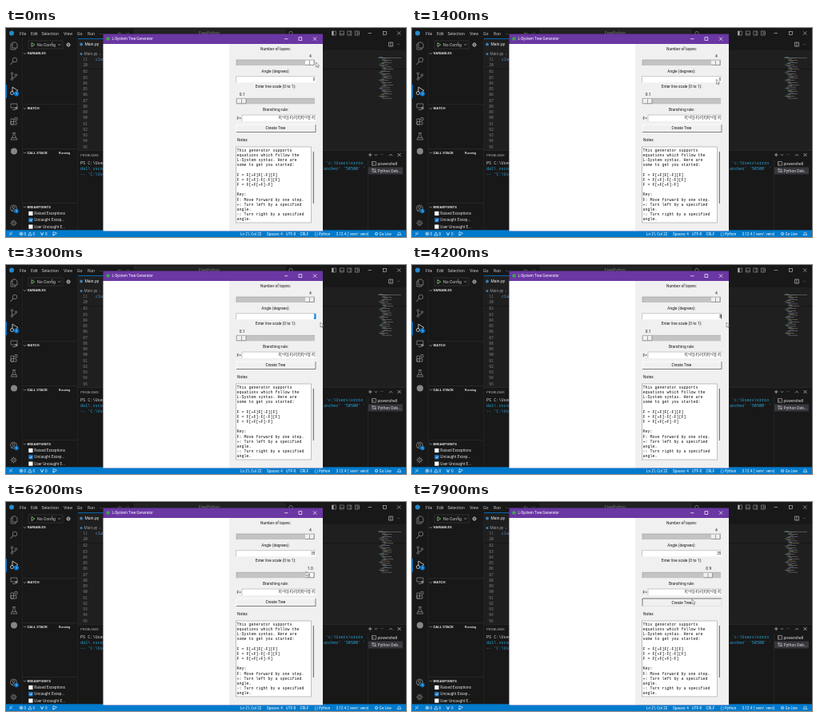
Recreate the animation shown at these times as an HTML page with a canvas. Size 500 by 262 pixels, loop 8 s.

```html
<!DOCTYPE html>
<html lang="en">
<head>
<meta charset="utf-8">
<title>L-System Tree Generator</title>
<style>
html, body { margin: 0; width: 100%; height: 100%; overflow: hidden; background: #181818; }
canvas { display: block; width: 500px; height: 262px; }
</style>
</head>
<body>
<canvas id="stage"></canvas>
<script>
const LOOP = 8000;
const UI = 'Roboto, "Open Sans", sans-serif';
const HUMANIST = '"Open Sans", "Noto Sans", sans-serif';
const CODE = '"Noto Sans Mono", "DejaVu Sans Mono", monospace';
const COURIER = '"Liberation Mono", monospace';
const canvas = document.getElementById('stage');
const ctx = canvas.getContext('2d');
const dpr = window.devicePixelRatio || 1;
canvas.width = 500 * dpr;
canvas.height = 262 * dpr;
ctx.scale(dpr, dpr);

function rect(x, y, w, h, fill) {
  ctx.fillStyle = fill;
  ctx.fillRect(x, y, w, h);
}
function box(x, y, w, h, color, lw = 0.7) {
  ctx.strokeStyle = color;
  ctx.lineWidth = lw;
  ctx.strokeRect(x, y, w, h);
}
function text(s, x, y, size, color, { font = UI, align = 'left', weight = 400 } = {}) {
  ctx.font = `${weight} ${size}px ${font}`;
  ctx.textAlign = align;
  ctx.textBaseline = 'middle';
  ctx.fillStyle = color;
  ctx.fillText(s, x, y);
}
function path(d, color, lw = 0.8, fill) {
  const p = new Path2D(d);
  if (fill) { ctx.fillStyle = fill; ctx.fill(p); }
  ctx.strokeStyle = color;
  ctx.lineWidth = lw;
  ctx.stroke(p);
}
function dot(x, y, r, fill) {
  ctx.fillStyle = fill;
  ctx.beginPath();
  ctx.arc(x, y, r, 0, 7);
  ctx.fill();
}
function ring(x, y, r, color, lw = 0.8) {
  ctx.strokeStyle = color;
  ctx.lineWidth = lw;
  ctx.beginPath();
  ctx.arc(x, y, r, 0, 7);
  ctx.stroke();
}
function gear(x, y, r, color) {
  ring(x, y, r * 0.8, color, 0.8);
  ring(x, y, r * 0.3, color, 0.6);
  for (let i = 0; i < 8; i++) {
    const a = i * Math.PI / 4, dx = Math.cos(a) * r, dy = Math.sin(a) * r;
    path(`M${x + dx * 0.8} ${y + dy * 0.8}L${x + dx * 1.25} ${y + dy * 1.25}`, color);
  }
}

function menuBar() {
  dot(7, 6.5, 3, '#2489ca');
  [['File', 17], ['Edit', 31], ['Selection', 44.5], ['View', 72], ['Go', 89], ['Run', 102], ['···', 117]]
    .forEach(([s, x]) => text(s, x, 7, 5.2, '#c4c4c4'));
  path('M140 6.5h5M142 4.5l-2 2 2 2', '#666', 0.5);
  path('M149 6.5h5M152 4.5l2 2-2 2', '#444', 0.5);
  rect(160, 2, 189, 9, '#222');
  box(160, 2, 189, 9, '#333', 0.5);
  text('FreePython', 254, 6.5, 5.2, '#777', { align: 'center' });
  ring(356, 6.5, 2.2, '#999', 0.6);
  for (let i = 0; i < 4; i++) {
    const x = 407.5 + i * 9.7, c = '#b0b0b0';
    box(x, 4, 5, 5, c, 0.5);
    if (i == 0) rect(x, 4, 2, 5, c);
    if (i == 1) path(`M${x} 7.3h5`, c, 0.5);
    if (i == 2) path(`M${x + 3.3} 4v5`, c, 0.5);
    if (i == 3) path(`M${x + 2.5} 4v5M${x + 2.5} 6.5h2.5`, c, 0.5);
  }
  path('M452.5 6.5h4.5M489 4.3l4.4 4.4M493.4 4.3l-4.4 4.4', '#ccc', 0.6);
  box(471.5, 4.5, 3.8, 3.8, '#ccc', 0.6);
}

function activityBar() {
  const c = '#868686';
  path('M8 18h4l2 2v5h-6zM8 20H6v7h6v-2', c);
  ring(11, 40, 2.8, c);
  path('M9 42l-3.5 4', c, 1);
  ring(7.5, 57, 1.3, c); ring(7.5, 64, 1.3, c); ring(12.5, 59, 1.3, c);
  path('M7.5 58.3v4.4M12.5 60.3q0 2-5 2', c);
  rect(0, 71, 1, 17, '#0078d4');
  path('M8 80v-6l7 4.5-4 2.5', '#e0e0e0');
  ring(7.5, 81.5, 2, '#e0e0e0');
  dot(13, 82.5, 3, '#0078d4');
  text('1', 13, 82.8, 4, '#fff', { align: 'center' });
  path('M6 95h8v5H6zM8 102.5h4', c);
  dot(13, 100.5, 1.7, c);
  path('M6 114h3.5v7H6zM6 117.5h7v3.5H6zM11 112.5h3v3h-3z', c);
  path('M8 131.5h4M9 131.5v3l-3 5.5h8l-3-5.5v-3M7.5 137.5h5', c);
  dot(10, 154.5, 4, c);
  ring(9.5, 226, 4, c); ring(9.5, 225, 1.5, c);
  path('M6.8 229q2.7-3 5.4 0', c);
  dot(13, 229.5, 2.7, '#0078d4');
  text('1', 13, 229.8, 3.7, '#fff', { align: 'center' });
  gear(9.5, 244.5, 3.2, c);
}

function sidebar() {
  box(28, 16, 43, 10, '#3c3c3c', 0.6);
  path('M32 18.5v5l3.8-2.5z', '#89d185', 0.8);
  text('No Config', 39, 21.2, 5.2, '#ccc');
  path('M65 20l1.7 1.7 1.7-1.7', '#ccc', 0.6);
  gear(78, 21, 2.3, '#bbb');
  [['VARIABLES', 32], ['WATCH', 101], ['CALL STACK', 156.5], ['BREAKPOINTS', 224.5]].forEach(([s, y], i) => {
    if (i) rect(20, y - 5.5, 69, 0.6, '#303030');
    path(`M22 ${y - 0.8}l1.5 1.5 1.5-1.5`, '#ccc', 0.6);
    text(s, 26.5, y, 4.4, '#e0e0e0', { weight: 700 });
  });
  text('Running', 66, 156.7, 3.9, '#eee', { weight: 500 });
  ['Raised Exceptions', 'Uncaught Excep...', 'User Uncaught E...'].forEach((s, i) => {
    const y = 232.5 + i * 8.3, on = i == 1;
    rect(28.3, y - 2.6, 5.2, 5.2, on ? '#1d7fd6' : '#fff');
    if (on) path(`M29.7 ${y}l1.1 1.2 1.9-2.4`, '#fff', 0.8);
    text(s, 35.3, y + 0.2, 4.75, '#ddd');
  });
}

function editor() {
  rect(90, 13, 410, 140, '#1f1f1f');
  rect(90, 13, 410, 15, '#181818');
  rect(90, 13, 40, 15, '#1f1f1f');
  rect(90, 13, 40, 0.8, '#0078d4');
  dot(94, 20.5, 1.9, '#3f7cac');
  text('Main.py', 98.5, 20.8, 5, '#eee');
  dot(94, 32.5, 1.5, '#3f7cac');
  text('Main.py  ›', 97.5, 32.7, 4.8, '#999');
  const num = (n, y) => text(n, 102, y, 4.8, '#7a8188', { font: CODE, align: 'right' });
  num(11, 40);
  num(20, 47);
  text('class', 112, 40, 5, '#569cd6', { font: CODE });
  rect(90, 51, 410, 0.6, '#111');
  for (let i = 0; i < 14; i++) num(82 + i, 55 + i * 7.25);
  path('M478.5 18h5v5h-5zM481 18v5', '#ccc', 0.6);
  text('···', 488.5, 20.5, 5, '#ccc');
  // minimap
  const tones = ['#4b8199', '#8a735f', '#6c8d70', '#777788'];
  for (let i = 0; i < 38; i++) {
    const indent = [0, 2, 4, 4, 6, 4, 2][i % 7];
    rect(466 + indent, 36 + i * 1.4, 5 + (i * 7 % 14), 0.6, tones[i * 3 % 4]);
  }
  rect(465, 37, 29, 0.6, '#777');
}

function terminal() {
  rect(90, 153, 410, 100, '#181818');
  rect(90, 153, 410, 0.6, '#303030');
  text('PROBLEMS', 93, 159.5, 4.4, '#aaa');
  const mono = (s, x, y, c = '#2aa3d6') => text(s, x, y, 5.15, c, { font: CODE });
  mono('PS C:\\Users', 93, 170, '#ddd');
  mono("'c:\\Users\\orrin", 400, 170);
  mono('dal\\.vscode', 93, 176.7);
  mono("uncher' '50500' '", 397, 176.7);
  mono("-- 'C:\\Users", 93, 183.5);
  path('M453 159h4.5M455.2 156.8v4.5M461 158.3l1.5 1.5 1.5-1.5', '#ccc', 0.7);
  text('···', 468, 159, 5, '#ccc');
  path('M479 160.3l2-2 2 2M489.5 157l4 4M493.5 157l-4 4', '#ccc', 0.7);
  rect(452, 165, 48, 88, '#181818');
  rect(452, 165, 0.6, 88, '#303030');
  rect(453, 174.5, 43, 9, '#37373d');
  box(457.5, 167.7, 5, 4.4, '#ccc', 0.6);
  path('M458.5 169l1 1-1 1', '#ccc', 0.5);
  path('M458 177h4v3.5h-4zM457 176l6 5', '#ccc', 0.6);
  text('powershell', 464.5, 170.2, 5.1, '#ddd');
  text('Python Deb...', 464.5, 179.2, 5, '#ddd');
}

function statusBar() {
  const c = '#fff';
  rect(0, 253.3, 500, 9, '#007acc');
  path('M4 256.5l2 1.8-2 1.8M8 255.5l-2 1.8 2 1.8', c, 0.6);
  ring(19, 258, 2, c, 0.6);
  path('M18 257l2 2M20 257l-2 2M30 256l-2.2 4h4.4z', c, 0.6);
  path('M43 256l2 4 2-4M45 257v3', c, 0.6);
  path('M59 255.5v4.5l4.5-2.7zM58 259.5h3', c, 0.6);
  [['0', 22.5], ['0', 33.5], ['0', 49], ['Ln 21, Col 22', 293], ['Spaces: 4', 326], ['UTF-8', 350],
    ['CRLF', 367.5], ['{ } Python', 385.5], ["3.12.4 ('.venv': venv)", 412.5], ['Go Live', 466.5]]
    .forEach(([s, x]) => text(s, x, 258.3, 4.6, c));
  ring(463, 258, 1.7, c, 0.6);
  dot(463, 258, 0.6, c);
  path('M489 259.5h5l-1-1v-1.5q-1.5-2-3 0v1.5z', c, 0.6);
}

function label(s, y) {
  text(s, 337, y, 4.85, '#161616', { align: 'center' });
}
function entry(x, y, h) {
  rect(x, y, 387.5 - x, h, '#fff');
  path(`M${x} ${y + h}V${y}H387.5`, '#aaa', 0.6);
}
function slider(y, x, value, hot) {
  text(value, x + 6.3, y - 4.3, 5, '#161616', { align: 'center' });
  rect(288, y, 98, 7, '#c3c3c3');
  path(`M288 ${y + 7}V${y}H386`, '#999', 0.6);
  rect(x, y + 0.7, 11, 5.8, hot ? '#fafafa' : '#f0f0f0');
  path(`M${x} ${y + 6.4}h11V${y + 0.6}M${x + 5.5} ${y + 1}v5`, '#777', 0.7);
}

const NOTES = ['This generator supports', 'equations which follow the',
  'L-System syntax. Here are', 'some to get you started:', '',
  'F = F[+F]F[-F][F]', 'F = F[+F]-F[-F][F]', 'F = F[+F[+F]-F]', '',
  'Key:', 'F: Move forward by one step.', '+: Turn left by a specified', 'angle.',
  '-: Turn right by a specified', 'angle.'];

function appWindow(t) {
  rect(121.5, 7.5, 274.5, 247, '#6a37a3');
  rect(121.5, 20, 158, 234.5, '#fff');
  rect(279, 20, 117, 234.5, '#f0f0f0');
  dot(127.5, 13.5, 2.2, '#3fa34d');
  text('L-System Tree Generator', 132.5, 14, 4.7, '#fff');
  path('M348 13.7h4.5M384 11.5l4.2 4.2M388.2 11.5l-4.2 4.2', '#fff', 0.7);
  box(366, 11.7, 3.8, 3.8, '#fff', 0.7);

  label('Number of layers:', 26.3);
  slider(40, 374, '4', t < 250);
  label('Angle (degrees):', 54.8);
  entry(287.5, 60.7, 7.6);
  const selected = t >= 1700 && t < 3900;
  const angle = t < 3900 ? '0' : t < 4300 ? '3' : '35';
  if (selected) rect(t < 2800 ? 384 : 384.8, 61.3, 2.7, 6.4, '#0078d7');
  text(angle, 386.4, 64.8, 4.7, selected ? '#fff' : '#222', { align: 'right' });
  if (t >= 3900 && t < 5600 && t % 1000 < 500) rect(386.3, 61.7, 0.8, 5.7, '#000');

  label('Enter line scale (0 to 1):', 74);
  const grabbed = t >= 5550 && t < 6700;
  const scale = t < 5550 ? 1 : t >= 6700 ? 9
    : Math.max(1, Math.min(10, 1 + Math.round((pointer(t)[0] - 291) / 9.4)));
  slider(88.3, 289 + (scale - 1) * 9.44, (scale / 10).toFixed(1), grabbed);

  label('Branching rule:', 102.8);
  text('F=', 288.5, 113.2, 4.8, '#161616');
  entry(295, 109, 7.8);
  text('F[+F][-F]-F[F]F[+F][-F]', 386.5, 113.1, 4.8, '#222', { font: HUMANIST, align: 'right' });
  const pressed = t >= 7650;
  path('M288 130.5V121H387', pressed ? '#555' : '#fff', 0.8);
  path('M288 130.5H387V121', pressed ? '#ddd' : '#666', 0.8);
  label('Create Tree', pressed ? 126.3 : 126);
  text('Notes', 289, 141, 4.85, '#161616');
  rect(287.5, 149, 94, 95, '#fff');
  box(287.5, 149, 94, 95, '#999', 0.6);
  NOTES.forEach((s, i) => text(s, 288.5, 153.2 + i * 6.2, 5, '#111', { font: COURIER }));
  rect(383.8, 155, 1.2, 65, '#777');
}

// [time, x, y] of the pointer tip
const PATH = [[0, 387.5, 43], [200, 387, 45], [700, 332, 70.5], [1000, 350, 66], [1350, 380, 64],
  [1800, 393, 72], [4600, 393, 72], [5100, 354, 74], [5450, 291, 90], [5600, 291, 90],
  [6100, 375, 87], [6250, 375, 87], [6600, 367, 89], [6800, 367, 90], [7500, 350, 122], [8000, 350, 122]];

function pointer(t) {
  const i = PATH.findIndex(p => p[0] > t);
  const [t0, x0, y0] = PATH[i - 1], [t1, x1, y1] = PATH[i];
  const u = (t - t0) / (t1 - t0), e = u * u * (3 - 2 * u);
  return [x0 + (x1 - x0) * e, y0 + (y1 - y0) * e];
}

function draw(now) {
  const t = now % LOOP;
  rect(0, 0, 500, 262, '#181818');
  menuBar();
  activityBar();
  sidebar();
  editor();
  rect(20, 13, 0.5, 240, '#2b2b2b');
  rect(89.5, 13, 0.6, 240, '#2b2b2b');
  terminal();
  statusBar();
  appWindow(t);
  const [x, y] = pointer(t);
  path(`M${x} ${y}v6l1.4-1.3 1 2.1.9-.4-1-2.1h1.9z`, '#333', 0.45, '#fff');
}

function tick(now) {
  draw(now);
  requestAnimationFrame(tick);
}
requestAnimationFrame(tick);
</script>
</body>
</html>
```
